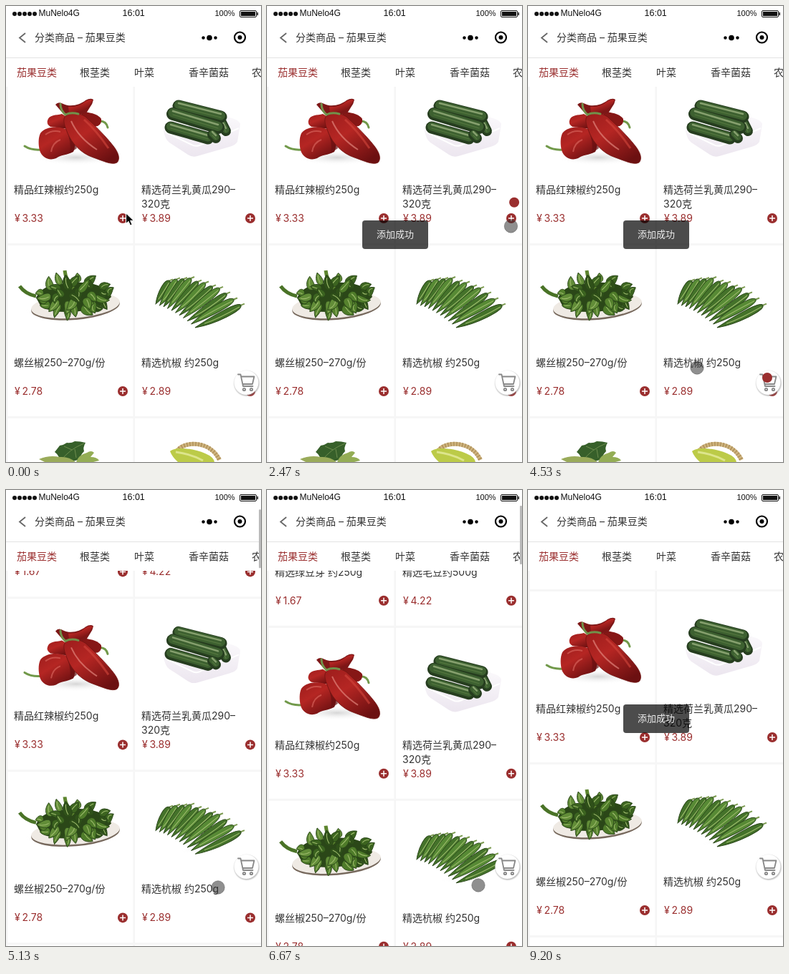
Animation of 356x638 px, one loop 9270 ms. Source, as an HTML page:

```html
<!DOCTYPE html>
<html lang="zh">
<head>
<meta charset="utf-8">
<title>分类商品</title>
<style>
html, body { margin: 0; width: 100%; height: 100%; overflow: hidden; background: #fff; }
svg { display: block; width: 356px; height: 638px; }
text { font: 14px Inter, "Noto Sans CJK SC", "Noto Sans CJK", sans-serif; fill: #333; }
.status { font-family: "Liberation Sans", sans-serif; fill: #111; }
.red { fill: #9a2e2e; }
</style>
</head>
<body>
<svg viewBox="0 0 356 638" xmlns="http://www.w3.org/2000/svg">
  <defs>
    <clipPath id="view"><rect y="113" width="356" height="525"/></clipPath>
    <linearGradient id="pepper" x1="0" y1="0" x2=".7" y2="1">
      <stop offset="0" stop-color="#9c1d1c"/><stop offset=".45" stop-color="#b52623"/><stop offset="1" stop-color="#6c1011"/>
    </linearGradient>
    <linearGradient id="tray" x1="0" y1="0" x2="0" y2="1">
      <stop offset="0" stop-color="#faf8fb"/><stop offset="1" stop-color="#ece6ef"/>
    </linearGradient>
    <radialGradient id="shade"><stop offset="0" stop-color="#bbb"/><stop offset="1" stop-color="#fff" stop-opacity="0"/></radialGradient>
    <radialGradient id="halo"><stop offset=".8" stop-color="#777" stop-opacity=".75"/><stop offset="1" stop-color="#999" stop-opacity="0"/></radialGradient>
  </defs>
  <rect width="356" height="638" fill="#fff"/>

  <g clip-path="url(#view)">
    <g id="list">
      <g id="grid" fill="#f6f6f6"></g>

      <!-- red peppers -->
      <ellipse cx="98" cy="212" rx="58" ry="11" fill="url(#shade)" opacity=".6"/>
      <g fill="none" stroke="#71994a" stroke-width="3" stroke-linecap="round">
        <path d="M26 196Q35 202 49 201"/><path d="M131 161Q140 161 142 170"/>
      </g>
      <path d="M100 158L108 148Q128 150 133 158Q134 165 128 168L112 170Z" fill="#861716"/>
      <path d="M69 138Q73 133 80 137C90 142 104 138 111 132Q118 128 122 131Q121 137 117 142L112 150L86 156Q77 148 69 138Z" fill="#7d1717"/>
      <path d="M87 141Q101 142 110 134Q117 129 121 132Q115 143 104 149H88Z" fill="url(#pepper)"/>
      <path d="M58 160C60 152 70 153 78 151L90 158L92 170C82 174 72 169 62 169Q56 165 58 160Z" fill="url(#pepper)"/>
      <path d="M48 178C57 167 76 168 88 174C96 180 99 194 94 204C85 209 76 208 70 213C60 217 50 212 47 202C45 194 45 184 48 178Z" fill="url(#pepper)"/>
      <path d="M84 173Q94 185 99 199L89 206Q92 190 84 173Z" fill="#651011" opacity=".7"/>
      <path d="M55 180Q64 173 76 176M63 204Q65 191 76 187" fill="none" stroke="#d8655d" stroke-width="2" opacity=".65"/>
      <path d="M82 155C88 149 101 148 111 155C124 167 140 183 150 196C157 205 160 214 155 219C148 223 136 217 122 212C104 206 92 192 86 178C82 168 79 160 82 155Z" fill="url(#pepper)" stroke="#721311" stroke-width=".8"/>
      <path d="M91 161C97 175 110 190 127 201" fill="none" stroke="#e58a82" stroke-width="2" opacity=".65"/>
      <path d="M109 159Q126 174 143 199" fill="none" stroke="#d3473d" stroke-width="3" opacity=".6"/>
      <path d="M76 137Q76 146 83 152Q91 148 101 151" fill="none" stroke="#71914a" stroke-width="3" stroke-linecap="round"/>

      <!-- cucumbers -->
      <path d="M220 174L308 155Q327 159 327 166L323 190Q320 195 312 197L267 210Q260 212 254 208L228 191Q222 187 220 174Z" fill="url(#tray)"/>
      <path d="M222 176L259 194Q264 197 270 195L325 171" fill="none" stroke="#fff" stroke-width="2"/>
      <g id="cukes" stroke-linecap="round"></g>

      <!-- plate of green chillies -->
      <ellipse cx="92" cy="427" rx="68" ry="13" fill="url(#shade)" opacity=".55"/>
      <ellipse cx="97" cy="421" rx="62" ry="18" fill="#76685c" transform="rotate(-5 97 421)"/>
      <ellipse cx="97" cy="419" rx="62" ry="17.5" fill="#efeae4" transform="rotate(-5 97 419)"/>
      <path d="M42 408Q50 392 68 391Q95 383 122 389Q143 394 147 407Q135 421 112 426Q70 432 49 421Z" fill="#2b4718"/>
      <g id="chillies"></g>

      <!-- long green peppers -->
      <ellipse cx="285" cy="437" rx="46" ry="7" fill="url(#shade)" opacity=".3" transform="rotate(-14 285 437)"/>
      <g id="fan"></g>

      <!-- tops of the next row -->
      <path d="M68 624Q72 619 75 615Q81 614 85 611Q91 612 96 609Q104 609 111 611Q107 618 109 623Q103 629 104 634L90 638H74Q76 630 68 624Z" fill="#37602a"/>
      <path d="M109 612Q88 620 76 637M92 621L81 616M96 620L98 632" fill="none" stroke="#6d8d4e" stroke-width="1"/>
      <path d="M46 634Q60 628 75 631Q88 630 97 638H54Z" fill="#9aab5a"/>
      <path d="M98 638Q101 628 113 625Q119 621 123 625L118 631Q127 631 130 636L122 638Z" fill="#94ad55"/>
      <path d="M239 622C250 608 285 608 298 635" fill="none" stroke="#cdb27c" stroke-width="6"/>
      <path d="M239 622C250 608 285 608 298 635" fill="none" stroke="#a3834d" stroke-width="6" stroke-dasharray="1 3"/>
      <path d="M229 623C237 616 262 619 278 626Q290 631 291 638H240Q232 631 229 623Z" fill="#bccb48"/>
      <path d="M237 624Q259 627 275 636" fill="none" stroke="#dde58c" stroke-width="3"/>

      <g id="items"></g>
    </g>
  </g>

  <!-- header -->
  <g id="signal" fill="#111"></g>
  <text class="status" x="45.5" y="14" style="font-size:12px">MuNelo4G</text>
  <text class="status" x="162.5" y="14" style="font-size:12.5px">16:01</text>
  <text class="status" x="291.5" y="14" style="font-size:11px">100%</text>
  <rect x="326.5" y="6.5" width="23" height="9" rx="1.5" fill="#fff" stroke="#111"/>
  <rect x="328" y="8" width="20" height="6" fill="#111"/>
  <rect x="350.5" y="9" width="1.5" height="4" fill="#111"/>
  <path d="M27 38L19 44.5L27 51" fill="none" stroke="#666" stroke-width="1.8"/>
  <text x="40" y="49">分类商品 – 茄果豆类</text>
  <circle cx="275.5" cy="44.5" r="2.2"/><circle cx="284" cy="44.5" r="3.8"/><circle cx="292.5" cy="44.5" r="2.2"/>
  <circle cx="326.5" cy="44" r="7.5" fill="none" stroke="#000" stroke-width="2.2"/><circle cx="326.5" cy="44" r="3"/>
  <rect y="72" width="356" height="1" fill="#e3e3e3"/>
  <g id="tabs"></g>

  <!-- floating cart -->
  <circle cx="336" cy="528" r="19" fill="url(#halo)"/>
  <circle cx="335.5" cy="527" r="17" fill="#fff"/>
  <g fill="none" stroke="#888" stroke-width="1.8" stroke-linejoin="round" stroke-linecap="round">
    <path d="M324 515.500H327.500L331 532H344.500M328.500 518.500H346.500L344 529H331"/>
    <circle cx="332.500" cy="536.500" r="1.700"/><circle cx="342.500" cy="536.500" r="1.700"/>
  </g>

  <circle id="ball" class="red" r="7"/>
  <g id="toast">
    <rect x="133" y="300" width="92" height="40" rx="4" fill="#000" opacity=".7"/>
    <text x="153" y="324" style="font-size:13px;fill:#eee">添加成功</text>
  </g>
  <rect id="bar" x="353" width="3" height="82" rx="1" fill="#bbb"/>
  <circle id="dot" r="9.2" fill="#333" fill-opacity=".55" stroke="#555" stroke-opacity=".6" stroke-width=".8"/>
  <path id="arrow" d="M167.500 290V304.500L171 301.300L173.500 307L176 305.800L173.600 300.300H178.200Z" fill="#000" stroke="#fff" stroke-width="1"/>
</svg>
<script>
const LOOP = 9270;
const $ = id => document.getElementById(id);
const put = (id, parts) => { $(id).innerHTML = parts.join(""); };
const range = n => [...Array(n).keys()];
const stroke = (d, color, w) => `<path d="${d}" fill="none" stroke="${color}" stroke-width="${w}"/>`;

let seed = 11;
const rnd = (a, b) => {
  seed = (seed * 16807) % 2147483647;
  return a + (b - a) * seed / 2147483647;
};

put("signal", range(5).map(i => `<circle cx="${12 + 7 * i}" cy="11" r="3"/>`));

put("tabs", [["茄果豆类", 15], ["根茎类", 103], ["叶菜", 179], ["香辛菌菇", 255], ["农家蛋", 343]]
  .map(([s, x], i) => `<text x="${x}" y="98"${i ? "" : ' class="red"'}>${s}</text>`));

put("grid", [
  ...[0, 177.5].map(x => `<rect x="${x}" y="-140" width="2.5" height="1000"/>`),
  ...[90, 332, 574].map(y => `<rect y="${y}" width="356" height="3"/>`)
]);

const products = [
  [["精选绿豆芽 约250g"], "1.67", 11, 15],
  [["精选毛豆约500g"], "4.22", 189, 15],
  [["精品红辣椒约250g"], "3.33", 11, 257],
  [["精选荷兰乳黄瓜290–", "320克"], "3.89", 189, 257],
  [["螺丝椒250–270g/份"], "2.78", 11, 499],
  [["精选杭椒 约250g"], "2.89", 189, 499]
];
put("items", products.map(([lines, price, x, y]) => {
  const px = x < 100 ? 163 : 341, py = y + 40;
  return lines.map((s, i) => `<text x="${x}" y="${y + 5 + 20 * i}">${s}</text>`).join("") +
    `<text class="red" x="${x + 1}" y="${py + 5}">¥<tspan x="${x + 11.5}">${price}</tspan></text>` +
    `<circle class="red" cx="${px}" cy="${py}" r="7"/>` +
    `<path d="M${px - 4} ${py}h8M${px} ${py - 4}v8" stroke="#fff" stroke-width="1.5"/>`;
}));

// each cucumber: x1, y1, x2, y2, width
put("cukes", [[300, 161, 307, 175, 14], [241, 140, 300, 155, 17], [233, 151, 296, 170, 18], [230, 170, 282, 185, 17], [288, 180, 293, 185, 14]]
  .map(([a, b, c, d, w]) => {
    const path = k => `M${a} ${b + k}L${c} ${d + k}`;
    return stroke(path(0), "#263d1f", w) + stroke(path(-1.5), "#3d6030", w - 5) +
      stroke(path(-4), "#86a06e", 2.5) + stroke(path(1), "#55783f", 1.2);
  }));

// tapered pod from its stem end, pointing along the angle in degrees
const pod = (x, y, angle, len, w, bend, color) => {
  const side = k => `${len * .6} ${k * w * .6 + bend}`;
  return `<g transform="translate(${x} ${y}) rotate(${angle})">` +
    `<path d="M0 0C0 ${-w * .7} ${side(-1)} ${len} 0C${side(1)} 0 ${w * .7} 0 0Z" fill="${color}" stroke="#2a4719" stroke-width=".9"/>` +
    stroke(`M3 -1Q${len * .5} ${bend - 1} ${len * .8} ${bend * .3}`, "#9dbb6c", 1.1) + "</g>";
};

const greens = ["#3c6420", "#4f7c2a", "#628d38", "#2f5019", "#56822e"];
put("chillies", [
  stroke("M19 392Q27 403 42 406", "#4a7327", 5),
  stroke("M82 370Q83 383 94 395", "#5d852f", 5),
  ...range(34).map(i => {
    const a = i * 2.4, r = Math.sqrt((34 - i) / 34);
    const x = 95 + Math.cos(a) * r * 46, y = 405 + Math.sin(a) * r * 19;
    const angle = r > .6 ? a * 57.3 + rnd(-50, 50) : rnd(-130, 130);
    return pod(x, y, angle, rnd(17, 27) - 7 * r, rnd(9, 13), rnd(-5, 5), greens[i % 5]);
  })
]);

put("fan", range(11).map(i => {
  const x = 228 + 10 * i, y = 382 + .58 * (i - 2) ** 2 + rnd(-2, 2);
  const bx = 209 + 5.5 * i, by = 417 + 1.6 * i + .17 * i * i;
  const dx = bx - x, dy = by - y;
  return stroke(`M${x} ${y}l5 -2`, "#7b9a50", 2) +
    pod(x, y, Math.atan2(dy, dx) * 57.3, Math.hypot(dx, dy), 10.5, rnd(-3, 2), i % 2 ? "#578a35" : "#44722a");
}));

const ease = p => p * p * (3 - 2 * p);
// keys: [time, value, value...]
const track = (keys, t) => {
  const n = keys.findIndex(k => k[0] > t);
  if (n === 0) return keys[0].slice(1);
  if (n < 0) return keys[keys.length - 1].slice(1);
  const a = keys[n - 1], b = keys[n], p = ease((t - a[0]) / (b[0] - a[0]));
  return a.slice(1).map((v, i) => v + (b[i + 1] - v) * p);
};

const scroll = [[4850, 0], [5400, 115], [6450, 115], [7160, 49]];
const pointer = [
  [130, 166, 302], [1300, 166, 302], [2050, 340.5, 308], [2650, 340.5, 308], [3400, 163, 545],
  [3800, 163, 545], [4530, 236, 506], [5000, 296, 556], [5900, 296, 556], [6500, 295, 553],
  [7200, 295, 553], [7800, 340, 588], [8350, 340, 588], [8850, 370, 588]
];
// taps: [time, x, y]
const taps = [[400, 166, 302], [2270, 341, 308], [3530, 163, 545], [8050, 340, 588]];
const CART = { x: 327, y: 513 };
const FLIGHT = 980, REST = 70;

const show = (el, on) => el.setAttribute("visibility", on ? "visible" : "hidden");
const move = (el, x, y) => el.setAttribute("transform", `translate(${x} ${y})`);
const curve = (a, b, c, p) => a * (1 - p) ** 2 + 2 * b * p * (1 - p) + c * p * p;

const list = $("list"), ball = $("ball"), toast = $("toast"), bar = $("bar"), dot = $("dot"), arrow = $("arrow");

function draw(t) {
  const [s] = track(scroll, t);
  move(list, 0, s);

  const scrolling = (t > 4850 && t < 5650) || (t > 6450 && t < 7450);
  show(bar, scrolling);
  bar.setAttribute("y", 22 + (99 - s) * .133);

  const tap = taps.filter(k => k[0] <= t).pop();
  const age = tap ? t - tap[0] : Infinity;
  const flying = age < FLIGHT + REST;
  show(ball, flying);
  if (flying) {
    const [, x, y] = tap, p = Math.min(1, age / FLIGHT);
    move(ball, 7 + curve(x, (x + CART.x) / 2, CART.x, p), 7 + curve(y, Math.min(y, CART.y) - 150, CART.y, p));
  }
  show(toast, age > 100 && age < 1600);

  show(arrow, t < 130);
  show(dot, t >= 130 && t < 8850);
  move(dot, ...track(pointer, t));
}

const start = performance.now();
function tick() {
  draw((performance.now() - start) % LOOP);
  requestAnimationFrame(tick);
}
tick();
</script>
</body>
</html>
```
